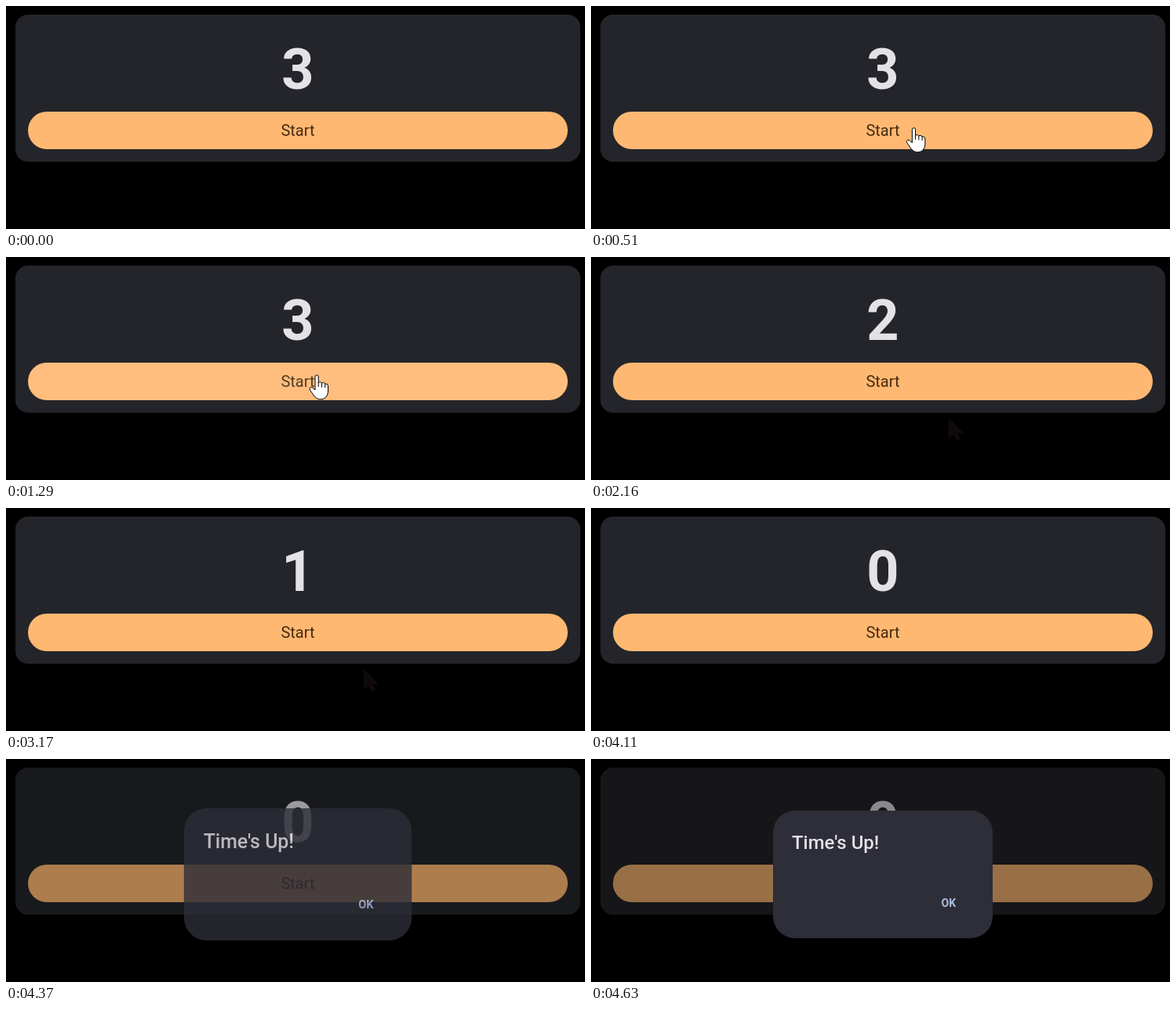
Write an HTML page that moves like this. It is 738 by 285 pixels and loops after 5.69 s.

```html
<!DOCTYPE html>
<html lang="en">
<head>
<meta charset="utf-8">
<title>Countdown</title>
<style>
  html, body { margin: 0; width: 100%; height: 100%; overflow: hidden; background: #000; }
  svg { display: block; width: 738px; height: 285px; }
  text { font-family: Roboto, sans-serif; }
  #count { font-size: 72px; font-weight: 700; fill: #e3e2e6; text-anchor: middle; }
  .label { font-size: 20px; fill: #482a10; text-anchor: middle; }
  .title { font-size: 24px; font-weight: 500; fill: #e3e1e9; }
  .ok { font-size: 14px; font-weight: 600; letter-spacing: .1px; fill: #abbddd; }
  .cursor { fill: #fff; stroke: #000; stroke-linejoin: round; }
</style>
</head>
<body>
<svg viewBox="0 0 738 285">
  <defs>
    <clipPath id="pill"><rect x="28" y="135" width="688" height="48" rx="24"/></clipPath>
    <path id="arrow" d="M0 0V27L6 22L10 30L15 28L11 20H19Z"/>
  </defs>
  <rect width="738" height="285"/>
  <rect x="12" y="11" width="720" height="188" rx="16" fill="#24252a"/>
  <text id="count" x="372" y="106">3</text>
  <rect x="28" y="135" width="688" height="48" rx="24" fill="#ffb872"/>
  <text class="label" x="372" y="166">Start</text>
  <circle id="ripple" cx="396" cy="151" fill="#fff" clip-path="url(#pill)"/>
  <use id="trail" href="#arrow" x="456" y="205" fill="#100a0c"/>
  <rect id="scrim" width="738" height="285"/>
  <g id="dialog">
    <rect x="232" y="67" width="280" height="163" rx="28" opacity=".3"/>
    <rect x="232" y="66" width="280" height="163" rx="28" fill="#2d2e38"/>
    <text class="title" x="256" y="115">Time's Up!</text>
    <text class="ok" x="446.5" y="189">OK</text>
  </g>
  <g id="pointer" class="cursor">
    <use id="pointerArrow" href="#arrow"/>
    <g id="pointerHand">
      <path d="M-2 2a2.1 2.1 0 0 1 4.2 0V9.5Q4.5 7.5 6.5 10Q9 8.5 10.7 11Q14.5 10.5 14.5 14V21Q14.5 25 11.5 28.5Q9 31 4 31Q0 30.5 -3 27L-8.5 19Q-10 16 -7.5 15.3Q-5 15 -2 19Z"/>
      <path d="M2.2 9V15M6.5 10V15.5M10.7 11V16" fill="none"/>
    </g>
  </g>
</svg>
<script>
  const LOOP = 5690;
  const TICK = 64.3; // the picture is held for one tick
  const ENTER = 130, ARRIVE = 650, SETTLE = 840, PRESS = 980, LEAVE = 1290, GONE = 1480;
  const COUNTS = [2160, 3170, 4110];

  const $ = id => document.getElementById(id);
  const set = (id, attrs) => {
    for (const name in attrs) $(id).setAttribute(name, attrs[name]);
  };
  const show = (id, on) => set(id, { display: on ? "inline" : "none" });
  const clamp = v => Math.min(1, Math.max(0, v));
  const span = (t, from, to) => clamp((t - from) / (to - from));
  const mix = (a, b, k) => a + (b - a) * k;

  // cubic-bezier(.4, 0, .2, 1)
  function ease(x) {
    let lo = 0, hi = 1, u = 0.5;
    for (let i = 0; i < 24; i++) {
      u = (lo + hi) / 2;
      const bx = 1.2 * u * (1 - u) ** 2 + 0.6 * u * u * (1 - u) + u ** 3;
      if (bx < x) lo = u; else hi = u;
    }
    return u * u * (3 - 2 * u);
  }

  // The pointer brakes on its way in and speeds up on its way out.
  function pointAt(t) {
    if (t < ARRIVE) {
      const rest = 1 - span(t, ENTER, ARRIVE);
      return [mix(404, 589, rest ** 2.4), mix(148, 264, rest ** 2)];
    }
    if (t < LEAVE) {
      const k = span(t, ARRIVE, SETTLE);
      return [mix(404, 396, k), mix(148, 151, k)];
    }
    const k = span(t, LEAVE, GONE);
    return [mix(396, 553, k ** 2.4), mix(151, 275, k ** 2)];
  }

  function drawPointer(t) {
    const [x, y] = pointAt(t);
    const onButton = y < 183;
    show("pointer", t >= ENTER - 5 && t < GONE);
    show("pointerHand", onButton);
    show("pointerArrow", !onButton);
    show("trail", t > GONE - TICK && t < COUNTS[2]);
    set("pointer", { transform: `translate(${x} ${y})` });
  }

  function drawRipple(t) {
    show("ripple", t >= PRESS && t < GONE);
    set("ripple", {
      r: mix(20, 380, ease(span(t, PRESS, PRESS + 260))),
      opacity: 0.08 * span(t, GONE, GONE - 160)
    });
  }

  function drawDialog(t) {
    const k = ease(span(t, 4131, 4594));
    set("scrim", { opacity: 0.4 * k });
    set("dialog", {
      opacity: k,
      transform: `translate(372 147.5) scale(${mix(1.184, 1, k)}) translate(-372 -147.5)`
    });
  }

  function draw(time) {
    const t = Math.floor((time + 8) / TICK) * TICK;
    $("count").textContent = 3 - COUNTS.filter(s => s <= time).length;
    drawPointer(t);
    drawRipple(t);
    drawDialog(t);
  }

  const start = performance.now();
  function frame() {
    draw((performance.now() - start) % LOOP);
    requestAnimationFrame(frame);
  }
  frame();
</script>
</body>
</html>
```
